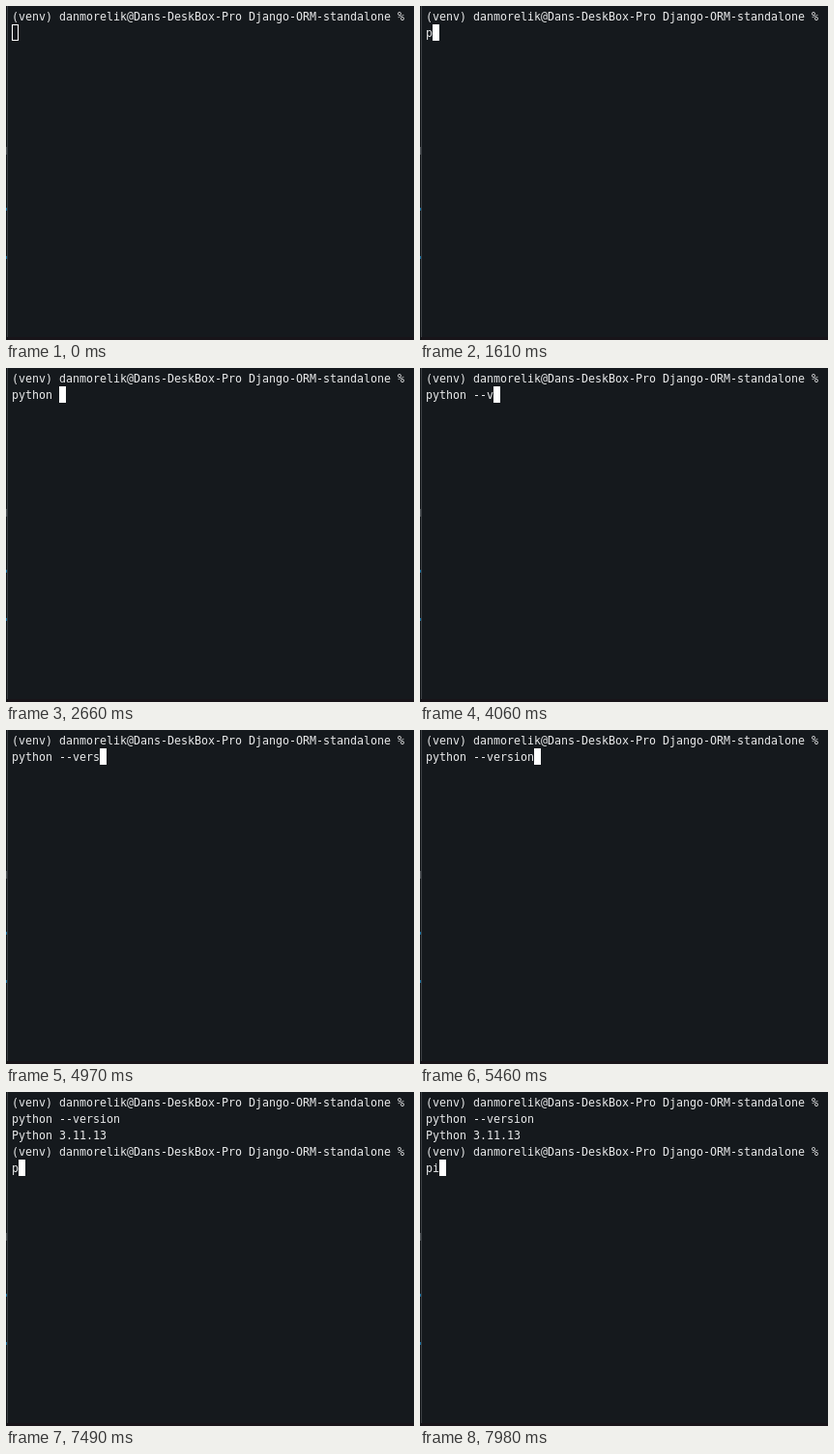
Recreate the animation shown at these times as an HTML page with a canvas. Size 422 px wide and 346 px high, loop 8000 ms.

```html
<!DOCTYPE html>
<html lang="en">
<head>
<meta charset="utf-8">
<title>Terminal</title>
<style>
  html, body { margin: 0; width: 100%; height: 100%; overflow: hidden; background: #15191d; }
  canvas { display: block; }
</style>
</head>
<body>
<canvas id="term" width="422" height="346"></canvas>
<script>
const ctx = document.getElementById('term').getContext('2d', { alpha: false });
const LOOP = 8000, FOCUS = 700, RUN = 5740;
const LEFT = 6, TOP = 19, CELL = 7, LINE = 17;
const PROMPT = '(venv) danmorelik@Dans-DeskBox-Pro Django-ORM-standalone %';
const COMMAND = {
  text: 'python --version',
  keys: [1610, 1820, 2030, 2240, 2310, 2590, 2660, 3290,
         3430, 4060, 4270, 4550, 4970, 5110, 5320, 5460]
};
const NEXT = { text: 'pi', keys: [7490, 7980] };

const typed = (cmd, t) => cmd.text.slice(0, cmd.keys.filter(k => k <= t).length);

function rect(color, x, y, w, h) {
  ctx.fillStyle = color;
  ctx.fillRect(x, y, w, h);
}

function drawWindow() {
  rect('#15191d', 0, 0, 422, 346);
  rect('#181419', 0, 343, 422, 3);
  rect('#0f1215', 0, 0, 1, 346);
  rect('#3b3f43', 1, 0, 1, 343);
  rect('#4a4e52', 0, 146, 1, 8);
  rect('#126a9c', 0, 209, 1, 3);
  rect('#126a9c', 0, 259, 1, 3);
}

function drawCursor(col, row, filled) {
  const x = LEFT + col * CELL, y = TOP + (row - 1) * LINE;
  if (filled) {
    rect('#ffffff', x, y, CELL, LINE);
  } else {
    ctx.strokeStyle = '#ffffff';
    ctx.lineWidth = 1;
    ctx.strokeRect(x + 0.5, y + 0.5, CELL - 1, LINE - 1);
  }
}

function draw(t) {
  const lines = [PROMPT, typed(COMMAND, t)];
  if (t >= RUN) lines.push('Python 3.11.13', PROMPT, typed(NEXT, t));

  drawWindow();
  ctx.font = '11.63px "DejaVu Sans Mono", monospace';
  ctx.textBaseline = 'alphabetic';
  ctx.fillStyle = '#e8e9ea';
  lines.forEach((line, i) => ctx.fillText(line, LEFT, 15 + i * LINE));

  const row = lines.length - 1;
  drawCursor(lines[row].length, row, t >= FOCUS);
}

const start = performance.now();
function tick(now) {
  draw(Math.max(0, now - start) % LOOP);
  requestAnimationFrame(tick);
}
draw(0);
requestAnimationFrame(tick);
</script>
</body>
</html>
```
